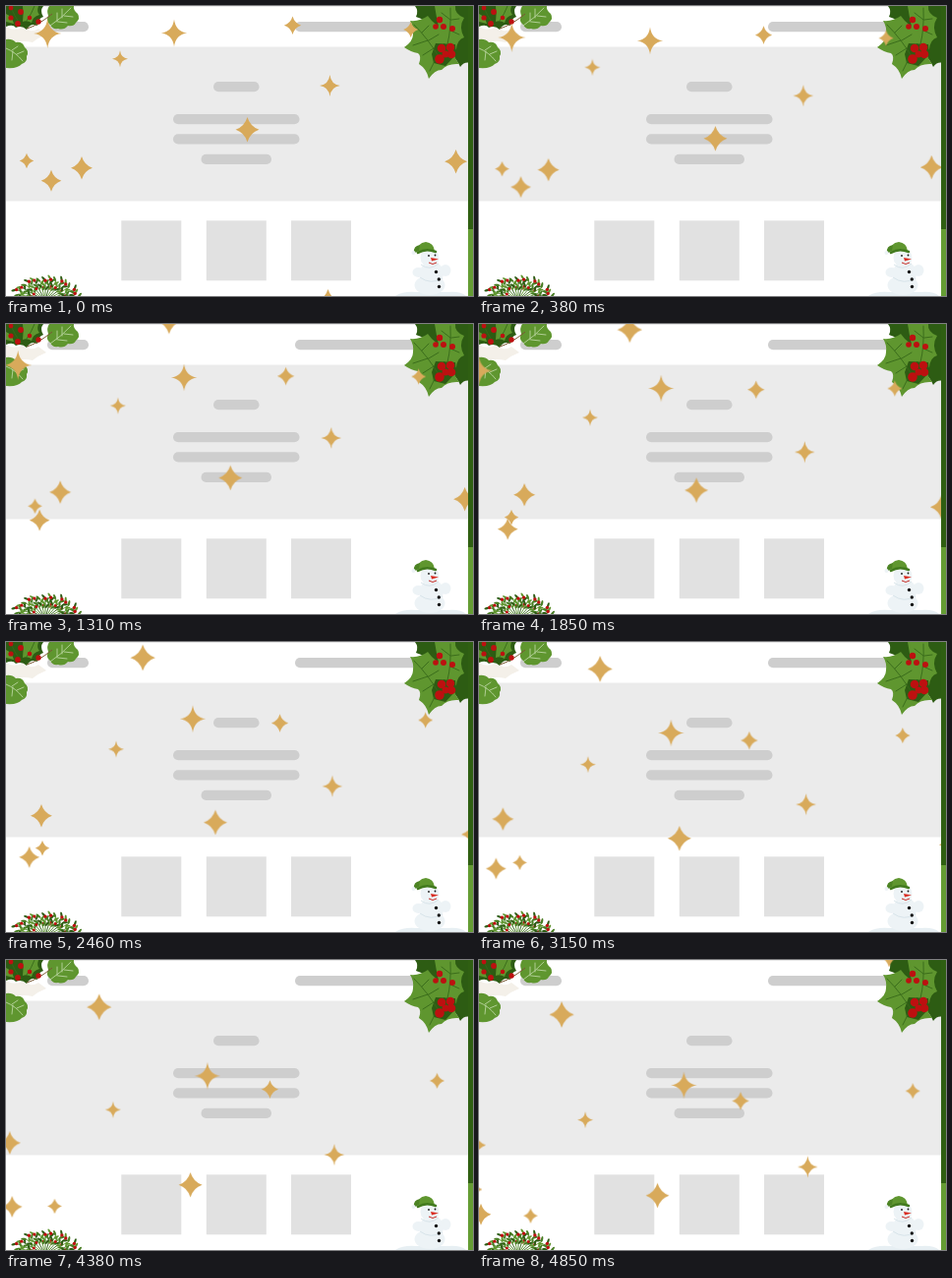
These frames come from a looping animation (475 by 295 pixels, 4920 ms). An HTML page:

```html
<!DOCTYPE html>
<html lang="en">
<head>
<meta charset="utf-8">
<title>Festive page</title>
<style>
  html, body { margin: 0; width: 100%; height: 100%; overflow: hidden; background: #fff; }
  svg { display: block; width: 475px; height: 295px; }
  .star { fill: #d8aa5b; animation: drift 4920ms steps(64, end) -5ms infinite; }
  @keyframes drift { to { transform: translate(var(--dx), var(--dy)); } }
  .dark { fill: #2d5c13; }
  .leaf { fill: #5f962f; }
  .red { fill: #bd1010; }
  .vein { fill: none; stroke: #37691a; stroke-width: .9; stroke-linecap: round; }
  .pale { fill: none; stroke: #c4dcae; stroke-width: .8; stroke-linecap: round; }
</style>
</head>
<body>
<svg viewBox="0 0 475 295" xmlns="http://www.w3.org/2000/svg">
  <rect width="475" height="295" fill="#fff"/>
  <rect width="470" height="1" fill="#ececec"/>
  <rect y="41.5" width="470" height="157" fill="#ebebeb"/>
  <g fill="#cecece">
    <rect x="42" y="16" width="42" height="10.300" rx="5.100"/>
    <rect x="294" y="16" width="136" height="10.300" rx="5.100"/>
    <rect x="211" y="77" width="46.500" height="10.300" rx="5.100"/>
    <rect x="170" y="110" width="128.500" height="10.300" rx="5.100"/>
    <rect x="170" y="130.300" width="128.500" height="10.300" rx="5.100"/>
    <rect x="198.500" y="150.700" width="71.500" height="10.300" rx="5.100"/>
  </g>
  <g fill="#e1e1e1">
    <rect x="117.300" y="218.300" width="61" height="61"/>
    <rect x="203.800" y="218.300" width="61" height="61"/>
    <rect x="290" y="218.300" width="61" height="61"/>
  </g>

  <!-- top left sprig -->
  <g>
    <path d="M0 21Q8 26 17 22Q25 28 33 23L41 29Q33 32 27 37Q16 34 0 39Z" fill="#f4f0e9"/>
    <path class="dark" d="M0 0H38Q34 5 38 11Q33 12 32 20Q25 17 21 24Q16 19 10 22Q7 18 0 21Z"/>
    <path class="leaf" d="M17 0H33Q31 6 34 9Q27 11 26 17Q21 14 17 16Q18 7 17 0ZM0 8Q6 10 8 18L0 16Z"/>
    <path class="vein" d="M29 0Q26 8 21 15M5 0Q7 9 16 20"/>
    <path class="leaf" d="M44 0H69Q68 4 73 8Q76 13 71 17Q69 21 63 20Q59 25 53 23Q47 24 45 19Q40 16 43 10Q41 4 44 0Z"/>
    <path class="pale" d="M45 20Q57 12 66 2M52 16V7M57 12V3M53 16L62 17M59 10L68 11"/>
    <path class="leaf" d="M0 34Q6 33 10 37Q17 36 19 42Q24 46 21 51Q22 57 16 59Q12 64 0 63Z"/>
    <path class="pale" d="M0 43Q10 47 17 56M6 45L12 41M11 49L18 46M7 46L6 55"/>
    <path d="M21 23Q32 20 47 8" fill="none" stroke="#7b5a35" stroke-width="1"/>
    <g class="red">
      <circle cx="12" cy="18" r="2.900"/><circle cx="15" cy="6" r="2.900"/>
      <circle cx="5" cy="12" r="2.600"/><circle cx="33" cy="16" r="2.700"/>
      <circle cx="24" cy="12" r="2.300"/><circle cx="5" cy="2" r="2.400"/>
    </g>
  </g>

  <!-- top right holly -->
  <g>
    <path class="dark" d="M416 0H475V59Q467 55 462 62Q459 54 453 51L432 20Q427 14 417 11Q420 5 416 0Z"/>
    <path class="leaf" d="M436 0H457Q456 8 466 12Q460 21 466 32Q459 34 458 44L447 43Q440 27 436 0Z"/>
    <path class="leaf" d="M411 15Q421 16 429 10Q436 20 446 23Q447 35 458 43Q453 50 461 59Q449 58 443 65Q436 65 430 74Q428 64 420 59Q423 51 419 48Q412 47 405 42Q414 36 414 29Q415 21 411 15Z"/>
    <path class="dark" d="M437 38L457 39L458 49L447 61L435 58L433 49Z"/>
    <path class="vein" d="M415 19Q430 34 441 53M423 27L430 20M430 35L440 29M429 35L414 40M435 43L424 50M438 52L431 66M452 2Q453 23 449 39M453 14L461 13M452 25L461 29M452 14L443 7"/>
    <path d="M441 53L446 38M449 51L453 39" fill="none" stroke="#2d5c13"/>
    <g class="red">
      <circle cx="441" cy="14" r="3.200"/><circle cx="437" cy="21" r="2.800"/>
      <circle cx="445" cy="21" r="3"/><circle cx="454" cy="23" r="3"/>
      <circle cx="443" cy="43" r="4.300"/><circle cx="452" cy="42" r="4.300"/>
      <circle cx="441" cy="54" r="4.800"/><circle cx="453" cy="49" r="4.300"/>
      <circle cx="447" cy="49" r="3.500"/>
    </g>
  </g>

  <g id="bush" stroke-linecap="round"></g>

  <!-- snowman -->
  <g>
    <path d="M396 295Q404 290 417 291H450Q462 290 468 295Z" fill="#e7eff3"/>
    <g fill="#edf3f6">
      <ellipse cx="419.500" cy="271" rx="6" ry="5"/>
      <ellipse cx="447" cy="269" rx="5.500" ry="6"/>
      <circle cx="433" cy="272" r="12"/>
      <ellipse cx="431" cy="284" rx="15.500" ry="10"/>
      <circle cx="431" cy="256" r="9.500"/>
    </g>
    <path d="M422 263Q431 270 440 262M421 276Q432 284 444 277" fill="none" stroke="#d8e4ea"/>
    <path class="leaf" d="M419 250Q418 241 427 240Q435 241 436 249Q428 246 419 250Z"/>
    <path d="M421 243Q414 244 415 251Q418 251 420 249Z" fill="#4c8323"/>
    <path d="M419 251Q427 246 437 250" fill="none" stroke="#427a1e" stroke-width="2.500" stroke-linecap="round"/>
    <circle cx="414.500" cy="251" r="2" fill="#edf3f6"/>
    <path d="M432 256L440 257.500L433 259.500Z" fill="#d92b20"/>
    <path d="M430 261Q434 264 438 261" fill="none" stroke="#c52b25"/>
    <g fill="#151515">
      <circle cx="430" cy="254" r=".9"/><circle cx="436.500" cy="253.500" r=".9"/>
      <circle cx="437.500" cy="270.500" r="1.700"/><circle cx="440.300" cy="278" r="1.700"/>
      <circle cx="440.500" cy="285.500" r="1.700"/>
    </g>
  </g>

  <clipPath id="page"><rect width="470" height="295"/></clipPath>
  <g id="stars" clip-path="url(#page)"></g>

  <rect x="470" width="5" height="227" fill="#2f5f12"/>
  <rect x="470" y="227" width="5" height="68" fill="#659d34"/>
</svg>
<script>
  const add = (parent, tag, attrs) => {
    const el = document.createElementNS('http://www.w3.org/2000/svg', tag);
    for (const key in attrs) el.setAttribute(key, attrs[key]);
    return parent.appendChild(el);
  };

  // x, y, radius, waist, total drift x, total drift y
  const SLIM = 0.11, FULL = 0.23;
  const stars = [
    [171, 27.5, 14, SLIM, 38, 101.5],
    [116, 53.7, 8.5, SLIM, -8, 110.6],
    [329.4, 81, 11, SLIM, 5, 131.5],
    [245.5, 125.7, 12.7, FULL, -65, 115.6],
    [291.5, 19.8, 9.2, FULL, -25.9, 125.6],
    [411.7, 24, 8, FULL, 30, 111],
    [457.6, 158.3, 12.2, FULL, 34, 75],
    [21, 157.5, 7.7, FULL, 32, 104.3],
    [46, 177.8, 11, FULL, -44.7, 82.3],
    [77, 164.7, 11.7, FULL, -82.2, 24],
    [196, -24.8, 13.4, FULL, -113.7, 81.6],
    [42.2, 28, 15, SLIM, -113, 52],
    [327.5, 300.5, 12.5, FULL, 0, 115],
    [425, -106, 11, FULL, -8, 104],
    [-36, 133, 8.5, FULL, 32, 102]
  ];
  const layer = document.getElementById('stars');
  for (const [x, y, r, waist, dx, dy] of stars) {
    const w = r * 0.94, k = r * waist;
    add(layer, 'path', {
      class: 'star',
      d: `M${x} ${y - r}Q${x + k} ${y - k} ${x + w} ${y}Q${x + k} ${y + k} ${x} ${y + r}` +
         `Q${x - k} ${y + k} ${x - w} ${y}Q${x - k} ${y - k} ${x} ${y - r}Z`,
      style: `--dx:${dx}px;--dy:${dy}px`
    });
  }

  // fan of twigs with leaves and berries
  let seed = 11;
  const rnd = () => (seed = (seed * 16807) % 2147483647) / 2147483647;
  const bush = document.getElementById('bush');
  const greens = ['#2d5c13', '#5f962f', '#477d22'];
  for (let i = 0; i < 17; i++) {
    const a = Math.PI * (1.04 + 0.92 * i / 16);
    const reach = 0.82 + 0.18 * rnd();
    const tx = 40 + 34 * Math.cos(a) * reach, ty = 299 + 23 * Math.sin(a) * reach;
    add(bush, 'path', { d: `M40 300L${tx} ${ty}`, stroke: greens[i % 3], 'stroke-width': 0.9 });
    for (let j = 1; j < 5; j++) {
      const f = 0.4 + j * 0.15, x = 40 + (tx - 40) * f, y = 300 + (ty - 300) * f;
      const turn = a * 180 / Math.PI + (j % 2 ? 42 : -42);
      add(bush, 'ellipse', {
        cx: 2.6, rx: 2.9, ry: 1.1, fill: greens[(i + j) % 3],
        transform: `translate(${x} ${y}) rotate(${turn})`
      });
    }
    if (i % 3 !== 1) {
      add(bush, 'circle', { cx: tx, cy: ty, r: 1.7, class: 'red' });
      add(bush, 'circle', { cx: tx * 0.6 + 16 + 6 * rnd(), cy: ty + 6 + 3 * rnd(), r: 1.5, class: 'red' });
    }
  }
</script>
</body>
</html>
```
